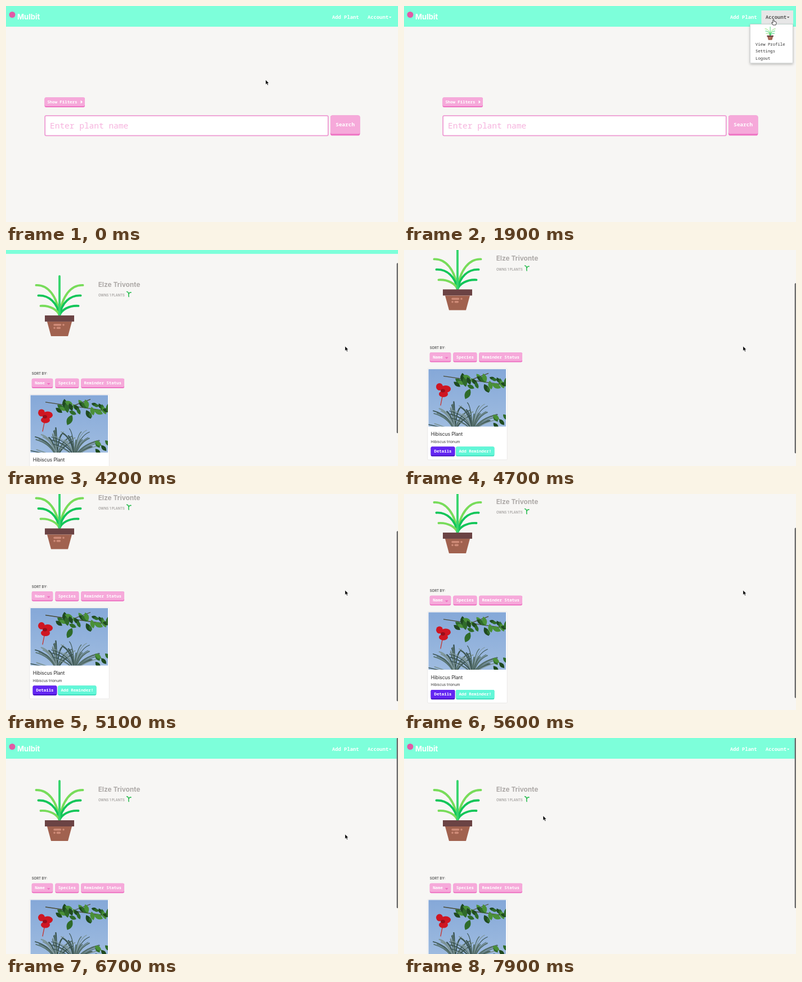
Animation of 696x386 px, one loop 8 s. Source, as an HTML page:

```html
<!DOCTYPE html>
<html lang="en">
<head>
<meta charset="utf-8">
<title>Plant profile</title>
<style>
  html, body { margin: 0; width: 100%; height: 100%; overflow: hidden; background: #f7f6f4; }
  svg { display: block; width: 100vw; height: 100vh; }
  text { font-family: "Noto Sans Mono", "DejaVu Sans Mono", monospace; white-space: pre; }
  .sans { font-family: Inter, Roboto, sans-serif; }
  .nav { font-size: 8.8px; font-weight: 600; }
  .label { font-size: 7.4px; font-weight: 700; fill: #fff; }
  .item { font-size: 7.3px; font-weight: 500; fill: #333; }
</style>
</head>
<body>
<svg viewBox="0 0 696 386" preserveAspectRatio="none">
  <defs>
    <linearGradient id="sky" x1="0" y1="0" x2="0" y2="1">
      <stop offset="0" stop-color="#85a8d8"/>
      <stop offset="1" stop-color="#9fbce0"/>
    </linearGradient>
    <filter id="soft"><feGaussianBlur stdDeviation="0.6"/></filter>
    <filter id="shade" x="-20%" y="-20%" width="140%" height="140%">
      <feDropShadow dx="0" dy="2" stdDeviation="2" flood-opacity="0.25"/>
    </filter>
    <clipPath id="frame"><rect x="43.5" y="289.5" width="137.5" height="102.5"/></clipPath>
    <g id="plant">
      <g id="blades" fill="none" stroke-width="3.9" stroke-linecap="round"></g>
      <rect x="69" y="147" width="52" height="11" fill="#6b4344"/>
      <path fill="#a1624f" d="M73 158H117L110 184H80Z"/>
      <path d="M86 163.8H96.5M102 163.8h.01M86 169.4h.01M91.3 169.4H95.3" stroke="#cf8b78" stroke-width="3.6" stroke-linecap="round"/>
    </g>
  </defs>

  <rect width="696" height="386" fill="#f7f6f4"/>
  <g id="page">
    <rect width="696" height="37" fill="#7dffda"/>
    <circle cx="11" cy="15.5" r="5.5" fill="#e25aa6"/>
    <text class="sans" x="20" y="23.5" font-size="13" font-weight="700" fill="#fff">Mulbit</text>
    <text class="nav" x="579" y="22.5" fill="#fff">Add Plant</text>
    <rect id="tab" x="634.5" y="8" width="56.5" height="24" fill="#e7e7e7"/>
    <g id="account">
      <text class="nav" x="642" y="22.5">Account</text>
      <path d="M680 19H684.4L682.2 21.4Z"/>
    </g>

    <g id="search">
      <rect x="69.2" y="196.2" width="502.8" height="35.4" rx="2" fill="#fff" stroke="#ee9bd3" stroke-width="1.8"/>
      <text x="78" y="218.5" font-size="14.5" fill="#f6b3de">Enter plant name</text>
    </g>

    <g id="profile">
      <use href="#plant"/>
      <text class="sans" x="163.7" y="96" font-size="11.8" font-weight="700" fill="#aeaaa8">Elze Trivonte</text>
      <text class="sans" x="164" y="113.3" font-size="5.75" font-weight="600" fill="#a5a2a0">OWNS 1 PLANTS</text>
      <path d="M218 113.5Q217 109 219 107Q220 105.6 222 106M217.8 109Q217.5 105 214.5 104.6" fill="none" stroke="#2cbd52" stroke-width="1.6" stroke-linecap="round"/>
      <text class="sans" x="45.7" y="253.3" font-size="6" font-weight="600" fill="#555">SORT BY:</text>
      <rect x="41.8" y="288.5" width="141.4" height="163" rx="1.5" fill="#fff" stroke="#e6e4e3" stroke-width="0.8"/>
      <g clip-path="url(#frame)">
        <rect x="43" y="289" width="139" height="104" fill="url(#sky)"/>
        <g id="palm" filter="url(#soft)" fill="none" stroke-linecap="round"></g>
        <path d="M70 302Q110 308 182 318M118 309L150 297" fill="none" stroke="#4a4a35" stroke-width="1.3"/>
        <g id="leaves"></g>
        <path d="M69 334L65 354" stroke="#c23b3a" stroke-width="1.4" stroke-linecap="round"/>
        <g fill="#cf1622">
          <ellipse cx="63" cy="321" rx="6" ry="6.5"/>
          <ellipse cx="74" cy="325" rx="9" ry="6.5"/>
          <ellipse cx="70" cy="334" rx="8" ry="5.5"/>
        </g>
        <ellipse cx="69" cy="328" rx="4" ry="3" fill="#960f1a"/>
      </g>
      <text class="sans" x="47.8" y="408.6" font-size="8.45" fill="#222">Hibiscus Plant</text>
      <text class="sans" x="47.8" y="421.2" font-size="6.5" fill="#333">Hibiscus trionum</text>
    </g>

    <g id="menu">
      <rect x="614.5" y="32.5" width="76" height="69.5" rx="1" fill="#fff" stroke="#c4c8c7" stroke-width="0.8" filter="url(#shade)"/>
      <rect id="row" x="615" y="62" width="75" height="12.6" fill="#f2f2f2"/>
      <use href="#plant" transform="translate(629.3 20.3) scale(.22)"/>
      <text class="item" x="624" y="70.6">View Profile</text>
      <text class="item" x="624" y="83.3">Settings</text>
      <text class="item" x="624" y="96">Logout</text>
    </g>
  </g>

  <rect id="thumb" x="693.6" width="3.4" height="304" rx="1.6" fill="#6e6e6e"/>
  <path id="arrow" d="M0 0V8.2L1.9 6.5L3.3 9.6L4.7 9L3.4 6H5.8Z" fill="#000" stroke="#fff" stroke-width="0.5"/>
  <path id="hand" d="M-1 0.8Q0 -0.8 1 0.8V3.6Q5 3.4 5 5.4V7.2L4 10H-1L-3.2 6.2Q-3.3 4.8 -2 5.4L-1 6.4Z" fill="#fff" stroke="#111" stroke-width="0.8" stroke-linejoin="round"/>
</svg>
<script>
const el = id => document.getElementById(id);
const add = (id, markup) => el(id).insertAdjacentHTML('beforeend', markup);
const show = (id, on) => { el(id).style.display = on ? '' : 'none'; };
const move = (id, x, y) => el(id).setAttribute('transform', `translate(${x} ${y})`);

let seed = 7;
const rand = (lo, hi) => {
  seed = (seed * 16807) % 2147483647;
  return lo + (hi - lo) * seed / 2147483647;
};

const PINK = ['#f6a9da', '#ee72c3'];
const VIOLET = ['#6326f2', '#4512c4'];
const MINT = ['#62f7d8', '#41dfbe'];

function button(id, x, y, w, label, [face, edge], h = 17.4, size = 7.4) {
  const band = h > 30 ? 3 : 2, r = band * 1.2;
  const left = x + (w - label.length * size * 0.6) / 2;
  add(id, `<rect x="${x}" y="${y}" width="${w}" height="${h}" rx="${r}" fill="${edge}"/>
    <rect x="${x}" y="${y}" width="${w}" height="${h - band}" rx="${r}" fill="${face}"/>
    <text class="label" x="${left}" y="${y + (h - band) / 2 + size * 0.36}" style="font-size:${size}px">${label}</text>`);
}

button('search', 68.5, 163.5, 71.5, 'Show Filters  ', PINK);
add('search', '<path d="M132.6 168.4L136 171.4L132.6 174.4Z" fill="#fff"/>');
button('search', 576, 195.4, 52.5, 'Search', PINK, 36.2, 9.4);
button('profile', 45.8, 259.8, 37.4, 'Name  ', PINK);
add('profile', '<path d="M72.8 268.2H78.6L75.7 271.2Z" fill="#ee6cc0"/>');
button('profile', 87.5, 259.8, 41.8, 'Species', PINK);
button('profile', 133.4, 259.8, 76.6, 'Reminder Status', PINK);
button('profile', 47.6, 428, 42.8, 'Details', VIOLET);
button('profile', 92.2, 428, 68.2, 'Add Reminder!', MINT);

// Three pairs of arching blades around the stem
const LIGHT = '#78dc5a', DARK = '#12c659';
for (let i = 0; i < 3; i++) {
  const y = 93 + 18.5 * i, reach = 41.5 - 4 * i;
  for (const side of [-1, 1]) {
    const color = i === 1 || (i === 2 && side > 0) ? DARK : LIGHT;
    const x = k => 95 + side * reach * k;
    add('blades', `<path stroke="${color}" d="M${x(1)} ${y}C${x(0.5)} ${y - 1} ${x(0.1)} ${y + 19 - 6 * i} 95 147"/>`);
  }
}
add('blades', '<path stroke="#38d56e" d="M95 77V148"/>');

// Two palm crowns rise from below the picture
for (const [base, lean] of [[90, -0.2], [122, 0.1]]) {
  for (let i = 0; i < 26; i++) {
    const a = lean + rand(-1.1, 1.1), len = rand(32, 56);
    const x = base + Math.sin(a) * len, y = 402 - Math.cos(a) * len;
    const shade = ['#3d5654', '#56706c', '#7d9598'][i % 3];
    add('palm', `<path d="M${base} 402Q${base + Math.sin(a) * 12} ${y + 8} ${x} ${y}" stroke="${shade}" stroke-width="${rand(1, 2.6)}"/>`);
  }
}

function leaf(x, y, r, turn, i) {
  add('leaves', `<path d="M${-r} 0Q0 ${-r} ${r} 0Q0 ${r} ${-r} 0Z" transform="translate(${x} ${y}) rotate(${turn})" fill="${['#1f4a20', '#2f6b2a', '#4a9038'][i % 3]}"/>`);
}
for (let i = 0; i < 26; i++) {
  const x = 94 + i * 3.5;
  leaf(x, 306 + (x - 94) * 0.13 + rand(-9, 13), rand(5, 9), rand(10, 85), i);
}
leaf(113, 334, 10, 115, 1);
for (let i = 0; i < 5; i++) leaf(rand(160, 181), rand(374, 392), 7, rand(20, 80), i);

const LOOP = 8000, STEP = 100;
const ease = (t, from, to) => {
  const p = Math.min(1, Math.max(0, (t - from) / (to - from)));
  return p * p * (3 - 2 * p);
};

// Each glide: start, end, x, y
const GLIDES = [
  [100, 400, 541, 112],
  [800, 1100, 643, 44],
  [1200, 1600, 656, 24],
  [2200, 2500, 650, 66],
  [2700, 3500, 607, 136],
  [3500, 3900, 602, 172],
  [7100, 7900, 247, 139],
];
const pointer = t => GLIDES.reduce(([x, y], [from, to, toX, toY]) => {
  const p = ease(t, from, to);
  return [x + (toX - x) * p, y + (toY - y) * p];
}, [461, 132]);

const scrollAt = t => 85.5 * (ease(t, 3700, 4950) - ease(t, 5400, 6500));

function draw(t) {
  const within = (from, to) => t >= from && t < to;
  const open = within(1900, 2800), link = within(1500, 2800);
  const [x, y] = pointer(t), scroll = scrollAt(t);

  show('search', t < 2600);
  show('profile', t >= 2600);
  show('menu', open);
  show('tab', open);
  show('row', within(2500, 2800));
  el('account').setAttribute('fill', link ? '#555' : '#fff');

  move('page', 0, -scroll);
  show('thumb', t >= 3700);
  el('thumb').setAttribute('y', scroll * 0.775);

  show('hand', link);
  show('arrow', !link);
  move('hand', x, y);
  move('arrow', x, y);
}

let start;
function tick(now) {
  start ??= now;
  draw(Math.floor((now - start) % LOOP / STEP) * STEP);
  requestAnimationFrame(tick);
}
draw(0);
requestAnimationFrame(tick);
</script>
</body>
</html>
```
